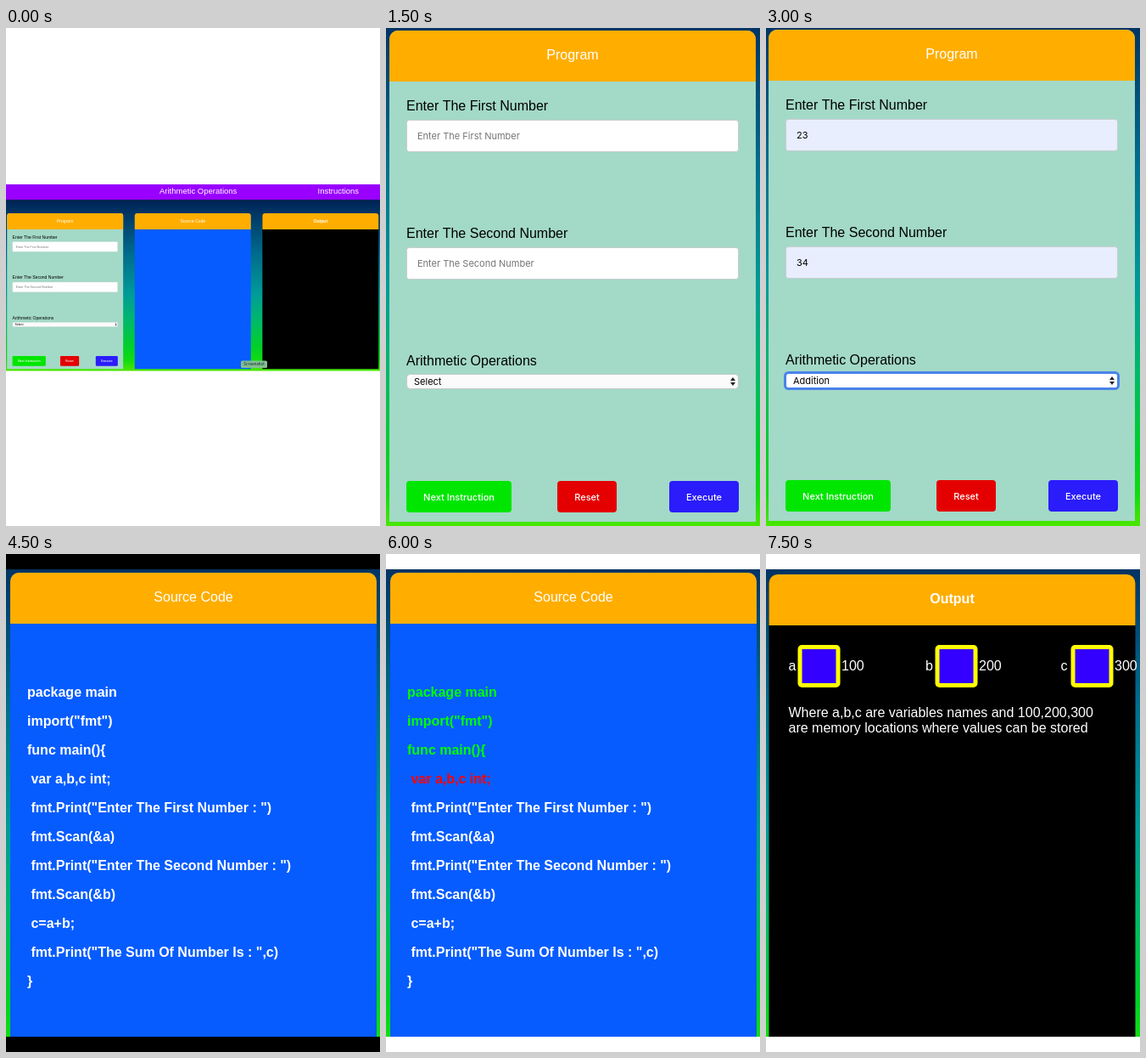
An HTML page with a canvas that plays this animation: 441x586 px, repeating every 8000 ms.

```html
<!DOCTYPE html>
<html lang="en">
<head>
<meta charset="utf-8">
<title>Arithmetic Operations</title>
<style>
html, body { margin: 0; width: 100%; height: 100%; overflow: hidden; background: #fff; }
canvas { display: block; }
</style>
</head>
<body>
<canvas id="stage" width="441" height="586"></canvas>
<script>
const W = 441, H = 586, LOOP = 8000, HOLD = 1500;
const ctx = document.getElementById('stage').getContext('2d');
const ARIAL = '"Liberation Sans", Arial, sans-serif';
const UI = 'Inter, sans-serif';
const ORANGE = '#ffae00', BLUE = '#065cff', MINT = '#a3d9c7';
const PANEL_W = 432, HEAD_H = 60;

// Vertical page colours, in pixels below the top edge of the panels
const PAGE_TOP = -50, PAGE_BOTTOM = 584;
const SHADES = [
  [-50, '#002255'], [-3, '#003463'], [147, '#006a8c'], [297, '#009a98'],
  [397, '#00b86c'], [497, '#00d028'], [546, '#12dc10'], [584, '#4be600']
];

function rect(x, y, w, h, color) {
  ctx.fillStyle = color;
  ctx.fillRect(x, y, w, h);
}

function rounded(x, y, w, h, r, fill, stroke, line = 1) {
  ctx.beginPath();
  ctx.roundRect(x, y, w, h, r);
  if (fill) { ctx.fillStyle = fill; ctx.fill(); }
  if (stroke) { ctx.strokeStyle = stroke; ctx.lineWidth = line; ctx.stroke(); }
}

function text(str, x, y, color, font = '16px ' + ARIAL, align = 'left') {
  ctx.font = font;
  ctx.fillStyle = color;
  ctx.textAlign = align;
  ctx.fillText(str, x, y);
}

function page(panelTop, y, h, scale = 1) {
  const g = ctx.createLinearGradient(0, panelTop + PAGE_TOP * scale, 0, panelTop + PAGE_BOTTOM * scale);
  for (const [at, color] of SHADES) g.addColorStop((at - PAGE_TOP) / (PAGE_BOTTOM - PAGE_TOP), color);
  rect(0, y, W, h, g);
}

function panel(x, y, title, body, bold = false, h = 578) {
  rounded(x, y, PANEL_W, h, [10, 10, 0, 0], body);
  rounded(x, y, PANEL_W, HEAD_H, [10, 10, 0, 0], ORANGE);
  text(title, x + PANEL_W / 2, y + 34, '#fff', (bold ? 'bold ' : '') + '16px ' + ARIAL, 'center');
}

function field(y, label, value) {
  text(label, 20, y - 11, '#000');
  rounded(20.5, y + 0.5, 391, 37, 3, value ? '#e8eefe' : '#fff', '#c9cdd0');
  text(value || label, 33, y + 23, value ? '#000' : '#757575', '11px ' + UI);
}

function button(x, w, label, color) {
  rounded(x, 530, w, 37, 4, color);
  text(label, x + w / 2, 553, '#fff', '500 11px ' + UI, 'center');
}

function triangle(x, y, dy) {
  ctx.beginPath();
  ctx.moveTo(x - 3, y);
  ctx.lineTo(x + 3, y);
  ctx.lineTo(x, y + dy);
  ctx.fill();
}

function select(value, focused) {
  text('Arithmetic Operations', 20, 394, '#000');
  if (focused) rounded(19.5, 403.5, 393, 19, 4, '#fff', '#4a83ea', 3);
  else rounded(20.5, 404.5, 391, 17, 4, '#fbfbfb', '#c4c8c8');
  text(value, 29, 417, '#000', '11px ' + UI);
  ctx.fillStyle = '#222';
  triangle(405, 412, -4);
  triangle(405, 414, 4);
}

function program(x, y, first, second, operation) {
  ctx.save();
  ctx.translate(x, y);
  panel(0, 0, 'Program', MINT);
  field(105, 'Enter The First Number', first);
  field(255, 'Enter The Second Number', second);
  select(operation || 'Select', !!operation);
  button(20, 124, 'Next Instruction', '#00e600');
  button(198, 70, 'Reset', '#e40000');
  button(330, 82, 'Execute', '#2a1cfb');
  ctx.restore();
}

function overview() {
  const scale = 0.317, top = 218;
  page(top, 202, 201.5, scale);
  rect(0, 184, W, 18, '#9900ff');
  text('Arithmetic Operations', 181, 194.5, '#fff', '9.5px ' + ARIAL);
  text('Instructions', 367.5, 194.5, '#fff', '9.5px ' + ARIAL);
  ctx.save();
  ctx.translate(1.2, top);
  ctx.scale(scale, scale);
  program(0, 0);
  panel(475, 0, 'Source Code', BLUE);
  panel(950, 0, 'Output', '#000', true);
  ctx.restore();
  rounded(277, 391.5, 31, 8.5, 1.5, '#82bd91');
  text('Screenshot', 292.5, 397.3, '#123', '4.6px ' + UI, 'center');
}

function form(x, y, ...values) {
  page(y, 0, H);
  program(x, y, ...values);
}

// Page seen between two bars, top and bottom
function framed(panelTop, bar, draw) {
  rect(0, 0, W, H, bar);
  page(panelTop, 18, 550);
  ctx.save();
  ctx.beginPath();
  ctx.rect(0, 18, W, 550);
  ctx.clip();
  draw(panelTop);
  ctx.restore();
}

const CODE = [
  'package main',
  'import("fmt")',
  'func main(){',
  ' var a,b,c int;',
  ' fmt.Print("Enter The First Number : ")',
  ' fmt.Scan(&a)',
  ' fmt.Print("Enter The Second Number : ")',
  ' fmt.Scan(&b)',
  ' c=a+b;',
  ' fmt.Print("The Sum Of Number Is : ",c)',
  '}'
];

function source(bar, current) {
  framed(22, bar, y => {
    panel(5, y, 'Source Code', BLUE);
    CODE.forEach((line, i) => {
      const color = i < current ? '#00ff00' : i === current ? '#ff0000' : '#fff';
      text(line, 25, y + 146 + i * 34, color, 'bold 16px ' + ARIAL);
    });
  });
}

function cell(name, nameX, x, address) {
  text(name, nameX, 137, '#fff');
  rounded(x, 107, 50, 50, 5, '#ffff00');
  rect(x + 5, 112, 40, 40, '#3300ff');
  text(address, x + 51.5, 137, '#fff');
}

function output() {
  framed(24, '#fff', y => {
    panel(3.5, y, 'Output', '#000', true);
    cell('a', 26.5, 37.5, '100');
    cell('b', 188, 199.5, '200');
    cell('c', 347.5, 359.5, '300');
    text('Where a,b,c are variables names and 100,200,300', 26.5, 192, '#fff');
    text('are memory locations where values can be stored', 26.5, 210, '#fff');
  });
}

const SCENES = [
  overview,
  () => form(4, 3),
  () => form(3, 2, '23', '34', 'Addition'),
  () => source('#000', -1),
  () => source('#fff', 3),
  output
];

function render(time) {
  rect(0, 0, W, H, '#fff');
  SCENES[Math.floor((time % LOOP) / HOLD)]();
}

const start = performance.now();
function tick() {
  render(performance.now() - start);
  requestAnimationFrame(tick);
}
tick();
</script>
</body>
</html>
```
